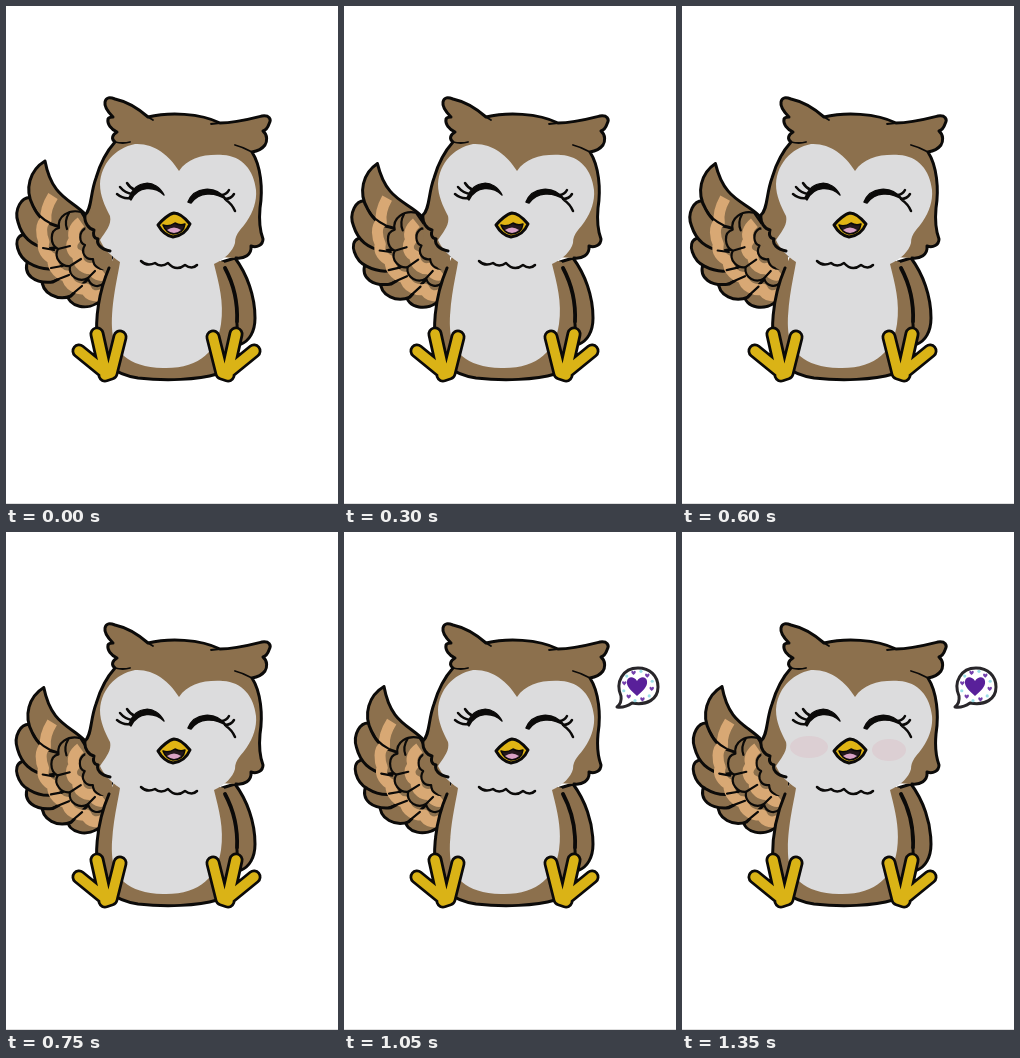
Write an HTML page that moves like this. It is 332 px wide and 498 px high and loops after 1.5 s.

```html
<!DOCTYPE html>
<html lang="en">
<head>
<meta charset="utf-8">
<title>Waving owl</title>
<style>
html, body { margin: 0; width: 100%; height: 100%; overflow: hidden; background: #fff; }
svg { display: block; width: 100%; height: 100%; }
.ink { stroke: #0b0a09; stroke-width: 3; stroke-linejoin: round; stroke-linecap: round; }
.thin { stroke-width: 2.2; }
.brown { fill: #8c704d; }
.tan { fill: none; stroke: #d8a874; stroke-width: 11; stroke-linejoin: round; }
.pale { fill: #dcdcdd; }
.line { fill: none; }
.foot { fill: none; stroke-linejoin: round; stroke-linecap: round; }
</style>
</head>
<body>
<svg viewBox="0 0 332 498">
  <defs>
    <path id="heart" d="M0 10C-5 5 -11 1 -10 -5C-9 -10 -3 -10 0 -5C3 -10 9 -10 10 -5C11 1 5 5 0 10Z"/>
    <path id="toes" d="M73 345L100 367M91 328L99 364M114 331L105 367L99 369"/>
    <path id="head" d="M104 245C95 243 90 238 92 233C87 232 87 228 88 224C83 223 78 217 79 209C86 203 84 188 90 172C94 158 100 146 109 136C105 133 106 129 111 126C105 123 101 118 102 113C103 111 105 111 107 111C102 106 98 101 99 96C100 91 104 91 109 93C123 96 134 104 142 111C163 106 194 107 214 117C230 117 244 113 256 110C263 109 266 113 263 118C262 121 260 124 257 125C262 129 261 136 259 139C256 143 252 145 246 146C255 160 257 183 254 202C253 213 254 225 257 233C257 239 251 242 245 240C246 249 238 253 230 252"/>
    <clipPath id="wingShape"><path d="M38 155C24 163 18 181 26 193C14 190 8 204 11 216C13 223 15 226 15 229C6 232 11 250 22 256C17 268 25 276 35 276C36 289 51 293 60 291C64 302 82 303 92 296L110 260L78 208C65 193 46 190 38 155Z"/></clipPath>
  </defs>
  <rect width="332" height="498" fill="#fff"/>
  <rect y="497" width="332" height="1" fill="#dedede"/>

  <g id="wing">
    <g class="ink brown">
      <path d="M60 286C60 302 82 305 93 295L105 264L72 260Z"/>
      <path d="M35 272C34 288 51 295 64 290L92 262L60 246Z"/>
      <path d="M21 254C15 269 28 278 46 276L86 255L50 232Z"/>
      <path d="M15 229C5 233 11 251 22 257C32 263 41 264 50 262L88 245L45 217Z"/>
      <path d="M26 192C14 189 7 204 11 216C15 231 24 239 40 243L86 236L50 200Z"/>
      <path d="M38 155C23 164 17 183 26 200C31 211 38 217 47 219L86 232L79 209C64 193 45 192 38 155Z"/>
    </g>
    <g clip-path="url(#wingShape)">
      <path class="tan" d="M46 190C41 198 38 206 39 214C33 218 34 229 37 236C34 243 40 250 46 253C45 263 54 270 60 270C61 280 71 284 79 283C82 291 91 291 96 288"/>
      <path class="ink thin line" d="M26 200Q31 211 43 217M36 242L47 244M44 262L55 260M44 276L62 269M63 290L75 280"/>
    </g>
    <path class="ink thin brown" d="M74 206C62 203 50 210 52 222C42 224 43 239 51 243C46 252 55 261 63 260C61 271 73 277 81 272C83 281 92 282 97 277L106 264L84 222Z"/>
    <path class="tan" d="M74 216C67 221 65 228 68 233C62 239 65 247 71 249C70 259 79 264 86 262C87 269 94 271 98 268"/>
    <path class="ink thin brown" d="M79 222C71 226 72 237 78 239C73 247 79 254 86 253C86 261 94 265 100 262L106 250L88 224Z"/>
    <path class="ink thin line" d="M62 207Q57 215 60 223M51 243L63 240M63 260L74 253M81 272L88 265"/>
  </g>

  <path class="brown" d="M79 213L106 236L106 268L94 262L80 238Z"/>
  <path class="ink brown" d="M229 252C241 268 249 290 249 312C249 326 243 335 235 338L222 330L216 256Z"/>
  <path class="brown" d="M103 262C94 283 89 309 91 337C95 359 112 369 132 372C159 375 192 374 211 368C230 360 233 343 231 318C231 296 226 276 218 256L160 240L110 246Z"/>
  <path class="ink line" d="M103 262C94 283 89 309 91 337C95 359 112 369 132 372C159 375 192 374 211 368C230 360 233 343 231 318"/>
  <path class="ink line" d="M219 262C227 277 232 295 231 316" style="stroke-width:3.8"/>

  <use href="#head" class="brown"/>
  <path class="pale" d="M173 165C163 149 148 137 129 138C109 142 95 158 94 178C94 190 99 200 104 210C106 219 99 226 94 234C98 243 105 250 114 256C112 270 105 296 106 322C107 345 121 361 157 362C194 363 211 345 215 318C218 296 213 278 208 258C219 253 227 245 229 237C229 227 236 223 241 215C247 206 251 195 250 184C248 164 236 150 217 149C197 148 182 152 173 165Z"/>
  <use href="#head" class="ink line"/>
  <path class="ink line" style="stroke-width:1.8" d="M109 136Q117 138 124 136M142 111L147 114M214 117L205 118M246 146Q237 141 229 139"/>
  <path class="ink line" style="stroke-width:2.5" d="M135 255Q141 261 149 257Q155 262 162 257Q170 266 179 259Q186 264 191 259"/>

  <g id="blush" fill="#dccfd3"><ellipse cx="127" cy="215" rx="19" ry="11"/><ellipse cx="207" cy="218" rx="17" ry="11"/></g>

  <g class="ink" style="stroke-width:1.5" fill="#0b0a09">
    <path d="M123 192C130 173 150 173 158 189C149 180 132 179 125 194Z"/>
    <path d="M182 196C188 181 209 178 221 194C208 185 193 186 185 197Z"/>
  </g>
  <path class="ink line" style="stroke-width:2.5" d="M124 192Q117 193 111 188M126 188Q119 187 114 181M129 184Q124 182 121 177M216 189Q221 188 223 184M219 193Q225 193 228 188M220 194Q226 198 229 205"/>
  <path class="ink" fill="#e0b414" d="M168 207C163 208 156 214 152 219C156 226 161 230 167 231C175 230 181 225 184 218C179 212 173 207 168 207Z"/>
  <path class="ink" fill="#24181c" style="stroke-width:1.5" d="M157 219Q163 221 169 217Q174 220 179 218C178 225 173 228 167 228C162 227 159 224 157 219Z"/>
  <path fill="#d9a2c5" d="M161 224Q168 219 175 224Q168 230 161 224Z"/>

  <g id="feet"></g>

  <g id="bubble">
    <path class="ink" fill="#fff" style="stroke:#28262a" d="M277 164C271 150 279 136 294 136C306 136 314 144 314 155C314 167 303 174 288 171Q281 176 273 175Q278 171 277 164Z"/>
    <use href="#heart" x="293" y="154" fill="#59209a"/>
    <g id="confetti"></g>
  </g>
</svg>
<script>
const $ = id => document.getElementById(id);
const STEP = 150;
const wingAngles = [0, -1.4, -2.8, -3.5, -2.8, -.6, .5];

const foot = place => `<g class="foot" transform="${place}">
  <use href="#toes" stroke="#0b0a09" stroke-width="15"/>
  <use href="#toes" stroke="#dab316" stroke-width="9.5"/>
</g>`;
$('feet').innerHTML = foot('') + foot('matrix(-1 0 0 1 321 0)');

// Small hearts and dots alternate around the large heart.
$('confetti').innerHTML = Array.from({ length: 12 }, (_, i) => {
  const a = i * Math.PI / 6 + .2, r = i % 2 ? 15 : 14;
  const x = 294 + r * Math.cos(a), y = 154 + r * Math.sin(a);
  return i % 2
    ? `<circle cx="${x}" cy="${y}" r="1.6" fill="#9adfe8"/>`
    : `<use href="#heart" transform="translate(${x} ${y}) scale(.22)" fill="#7440ad"/>`;
}).join('');

function draw(now) {
  const step = Math.floor(now % 1500 / STEP);
  // The wing waves once, then rests in its last pose.
  const angle = wingAngles[Math.min(step, wingAngles.length - 1)];
  $('wing').setAttribute('transform', `rotate(${angle} 88 270) translate(1 0)`);
  $('bubble').style.display = step >= 7 ? '' : 'none';
  $('blush').setAttribute('opacity', step === 9 ? 1 : step === 8 ? .6 : 0);
}

let start;
function tick(now) {
  start ??= now;
  draw(now - start);
  requestAnimationFrame(tick);
}
draw(0);
requestAnimationFrame(tick);
</script>
</body>
</html>
```
